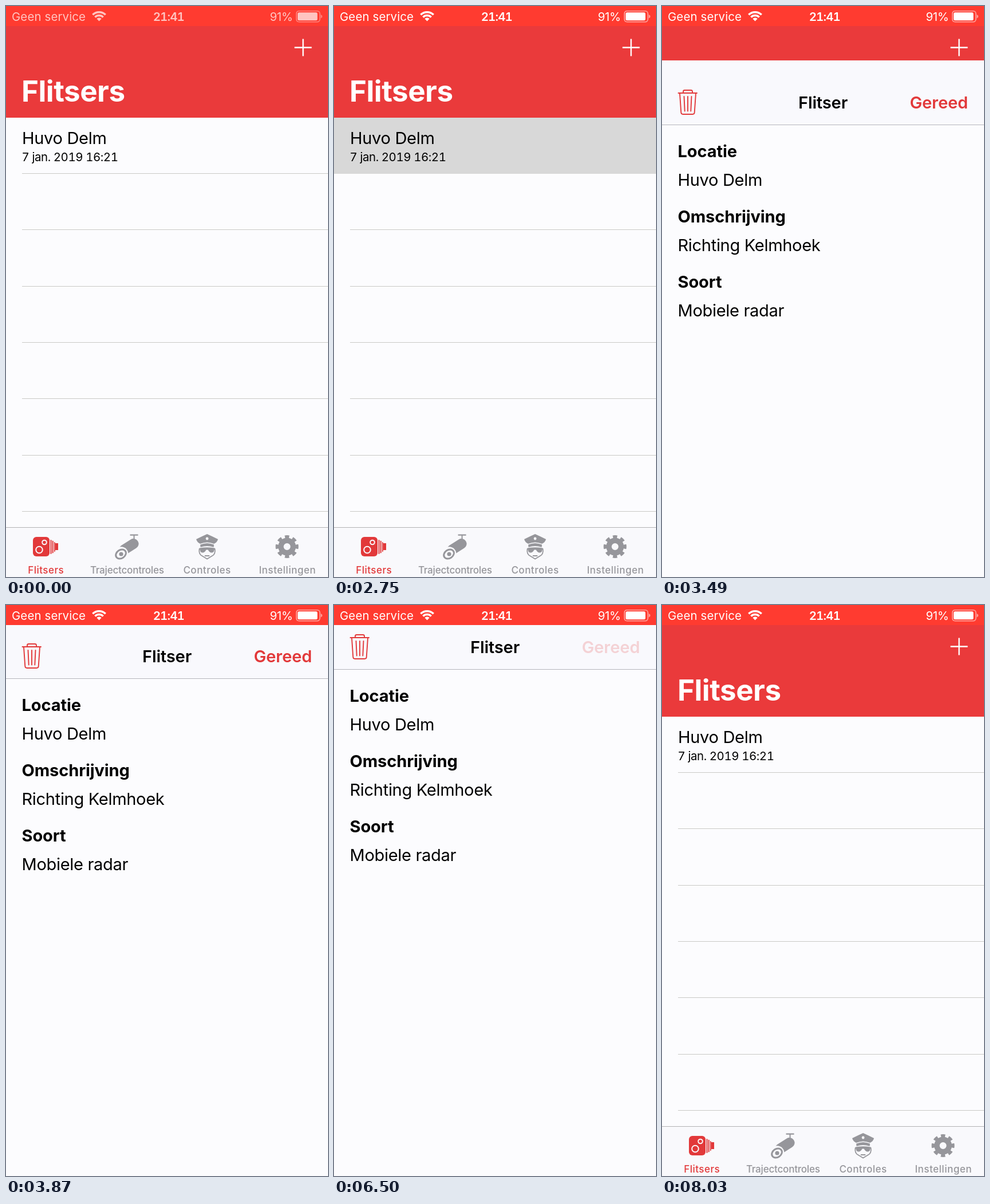
Animation of 562x997 px, one loop 8.06 s. Source, as an HTML page:

```html
<!DOCTYPE html>
<html lang="nl">
<head>
<meta charset="utf-8">
<title>Flitsers</title>
<style>
  html, body { margin: 0; width: 100%; height: 100%; overflow: hidden; background: #fcfcfe; }
  svg { display: block; width: 100%; height: 100%; }
  text { font-family: Inter, "Liberation Sans", sans-serif; font-optical-sizing: none; }
  .large { font-size: 51px; font-weight: 700; letter-spacing: -.45px; fill: #fff; }
  .body { font-size: 29px; letter-spacing: -.3px; }
  .label { font-size: 29px; font-weight: 700; letter-spacing: -.1px; }
  .head { font-size: 29px; font-weight: 600; letter-spacing: -.1px; }
  .date { font-size: 20.4px; letter-spacing: -.4px; font-variant-numeric: tabular-nums; }
  .status { font-size: 20.4px; fill: #fff; }
  .clock { font-weight: 600; letter-spacing: -.8px; font-variant-numeric: tabular-nums; }
  .tab { font-size: 17px; font-weight: 500; letter-spacing: .5px; text-anchor: middle; }
  .mid { text-anchor: middle; }
  .end { text-anchor: end; }
  .line { fill: none; stroke-linecap: round; stroke-linejoin: round; }
</style>
</head>
<body>
<svg viewBox="0 0 562 997" preserveAspectRatio="none">
  <rect width="562" height="997" fill="#fcfcfe"/>

  <!-- list screen -->
  <g id="rules" fill="#c9c9c6"></g>
  <rect id="press" y="195" width="562" height="98" fill="#d8d8d8" opacity="0"/>
  <rect y="35" width="562" height="160" fill="#ea3a3b"/>
  <path d="M503.5 72.5h30M518.5 57.5v30" stroke="#fff" stroke-width="2.4"/>
  <text class="large" x="27" y="167">Flitsers</text>
  <text class="body" x="28" y="240.5">Huvo Delm</text>
  <text class="date" x="27.5" y="270.5">7 jan. 2019 16:21</text>

  <!-- tab bar -->
  <rect y="910" width="562" height="87" fill="#f9f9fc"/>
  <rect y="910" width="562" height="1" fill="#b2b2b4"/>
  <g fill="#e2393a">
    <rect x="47" y="927" width="29" height="34" rx="6"/>
    <path d="M77.5 932l2 .6v23.8l-2 .6zM80.7 933.4l2 .6v21l-2 .6zM84 936l1.8.5v16l-1.8.5zM86 938h5v12h-5z"/>
    <g fill="none" stroke="#f9f9fc" stroke-width="2">
      <circle cx="58" cy="949.5" r="5.8"/>
      <circle cx="67" cy="936.5" r="3.8"/>
    </g>
    <text class="tab" x="69.7" y="991">Flitsers</text>
  </g>
  <g fill="#96969b">
    <path d="M216.5 922.5h14v2.2h-6v7h-2v-7h-6z"/>
    <path class="line" d="M206 949.5L222.5 939" stroke="#96969b" stroke-width="18"/>
    <circle cx="201" cy="956.5" r="12.3" fill="#f9f9fc"/>
    <ellipse cx="200.5" cy="957" rx="9.5" ry="7.3" transform="rotate(-35 200.5 957)" fill="none" stroke="#96969b" stroke-width="3"/>
    <circle cx="201" cy="957" r="3.6"/>
    <text class="tab" x="211.3" y="991" style="letter-spacing:-.2px">Trajectcontroles</text>

    <path d="M332 931Q342 926 351 922Q360 926 370 931Q369 936 363 939Q351 934 339 939Q333 936 332 931Z"/>
    <circle cx="351" cy="930" r="2.4" fill="#f9f9fc"/>
    <path d="M339 940.5Q351 935.5 363 940.5L362.5 945Q351 941 339.5 945Z"/>
    <path d="M337.5 946.5Q351 944 364.5 946.5L362.5 953Q357 957.5 352.5 949.5H349.5Q345 957.5 339.5 953Z"/>
    <path class="line" d="M337.5 948Q336 957 342 960L351 965.5L360 960Q366 957 364.5 948M347.5 960h7" stroke="#96969b" stroke-width="1.8"/>
    <text class="tab" x="351" y="991">Controles</text>

    <g fill="none" stroke="#96969b">
      <circle cx="490.5" cy="944" r="10.7" stroke-width="9.4"/>
      <circle cx="490.5" cy="944" r="17" stroke-width="6" pathLength="16" stroke-dasharray="1.1 .9" stroke-dashoffset=".55"/>
    </g>
    <text class="tab" x="491.2" y="991">Instellingen</text>
  </g>

  <!-- detail sheet -->
  <g id="sheet" transform="translate(0 997)">
    <rect width="562" height="998" fill="#fcfcfe"/>
    <rect width="562" height="112" fill="#f9f9fd"/>
    <rect y="112" width="562" height="1" fill="#b5b5bc"/>
    <g class="line" stroke="#e2393a" stroke-width="1.9">
      <path d="M28.5 57H61M37 56.5V54.5Q37 52 39.5 52H50.5Q53 52 53 54.5V56.5"/>
      <path d="M31 57.5L33.3 91Q33.6 94 36.5 94H53.5Q56.4 94 56.7 91L59 57.5"/>
      <path d="M38.5 63L39.7 88.5M45 63V88.5M51.5 63L50.3 88.5"/>
    </g>
    <text class="head mid" x="281" y="84">Flitser</text>
    <text id="done" class="head end" x="534" y="84" fill="#e2393a">Gereed</text>
    <g id="fields"></g>
  </g>

  <!-- status bar -->
  <rect width="562" height="35" fill="#ff3b30"/>
  <g id="status" fill="#fff">
    <text class="status" x="10" y="25.5" letter-spacing=".15">Geen service</text>
    <path d="M151.3 15.3A15.8 15.8 0 0 1 173.7 15.3M155.4 19.4A10 10 0 0 1 169.6 19.4" fill="none" stroke="#fff" stroke-width="3.5"/>
    <path d="M162.5 26.5L158.3 22.3A6 6 0 0 1 166.7 22.3Z"/>
    <text class="status clock mid" x="283.8" y="25.5">21:41</text>
    <text class="status end" x="500.5" y="25.5" letter-spacing="-.3">91%</text>
    <rect x="506.8" y="8.7" width="41" height="19" rx="4.5" fill="none" stroke="#fff" stroke-opacity=".55" stroke-width="1.6"/>
    <rect x="509" y="11.3" width="34.5" height="14" rx="2.5"/>
    <path d="M549.5 15Q552 16 552 18.2Q552 20.5 549.5 21.5Z" fill-opacity=".55"/>
  </g>
</svg>
<script>
const LOOP = 8060, HEIGHT = 997, RATE = 5.83 / 1000;
const OPEN = 2812, CLOSE = 6501;
const $ = id => document.getElementById(id);
const clamp = v => Math.max(0, Math.min(1, v));

const cadence = [
  [0, 30], [30, 52.5], [450, 2300], [2750, 40], [2790, 46.67],
  [3490, 100], [3590, 43.53], [4330, 100], [4430, 2070], [6500, 100],
  [6600, 42.86], [6900, 100], [7000, 42.86], [7300, 20], [7320, 50.72], [8030, 30]
];

const fields = [
  ["Locatie", "Huvo Delm"],
  ["Omschrijving", "Richting Kelmhoek"],
  ["Soort", "Mobiele radar"]
];

function add(parent, tag, attrs, text = "") {
  const el = document.createElementNS("http://www.w3.org/2000/svg", tag);
  for (const key in attrs) el.setAttribute(key, attrs[key]);
  el.textContent = text;
  parent.append(el);
}

for (let i = 0; i < 7; i++) {
  add($("rules"), "rect", { x: 28, y: Math.round(292.1 + i * 98.33), width: 534, height: 1 });
}
fields.forEach(([label, value], i) => {
  add($("fields"), "text", { class: "label", x: 27.5, y: 168.5 + i * 114 }, label);
  add($("fields"), "text", { class: "body", x: 27.5, y: 218.5 + i * 114 }, value);
});

function snap(t) {
  const [from, step] = cadence.filter(c => c[0] <= t).pop();
  return from + Math.floor((t - from) / step) * step;
}

// Critically damped spring: share of the way still to go
function rest(ms) {
  const u = Math.max(0, ms) * RATE;
  return (1 + u) * Math.exp(-u);
}

function sheetTop(t) {
  if (t < 4430) return HEIGHT * rest(t - OPEN);
  if (t < 6600) return 0;
  if (t < 8030) return HEIGHT * (1 - rest(t - CLOSE));
  return HEIGHT;
}

function draw(now) {
  const t = snap(now % LOOP);
  $("sheet").setAttribute("transform", `translate(0 ${Math.round(sheetTop(t))})`);
  $("press").setAttribute("opacity", t < 2750 ? 0 : clamp((3300 - t) / 500));
  $("done").setAttribute("opacity", t < 6500 ? 1 : clamp(0.2 + (t - 6500) / 950));
  $("status").setAttribute("opacity", t < 30 ? 0.7 : clamp(0.73 + 0.27 * (t - 30) / 420));
}

const start = performance.now();
function tick() {
  draw(performance.now() - start);
  requestAnimationFrame(tick);
}
tick();
</script>
</body>
</html>
```
